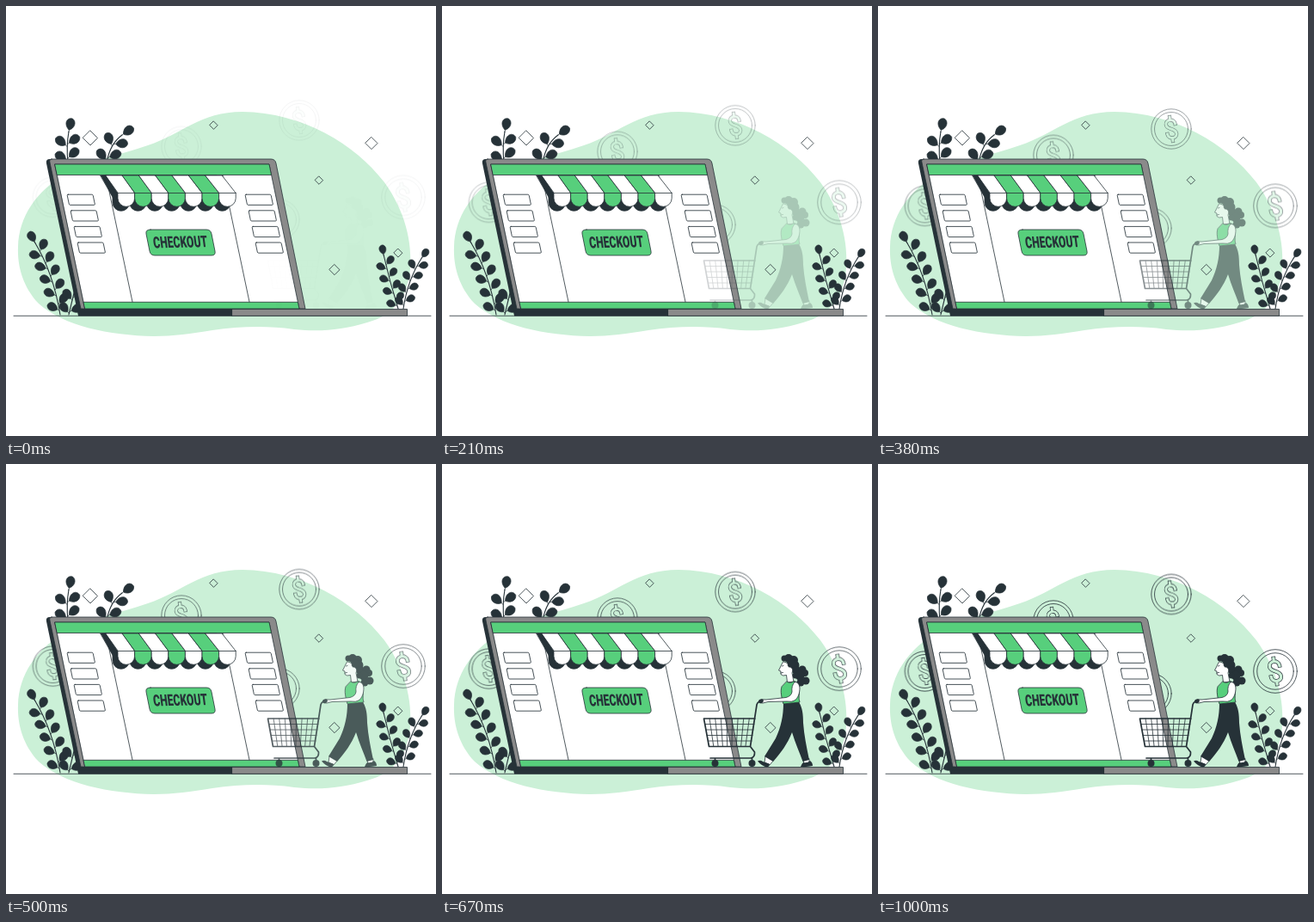
These frames come from a looping animation (500x500 px, 1.04 s). An HTML page:

```html
<!DOCTYPE html>
<html lang="en">
<head>
<meta charset="utf-8">
<title>Checkout</title>
<style>
html, body { margin: 0; width: 100%; height: 100%; overflow: hidden; background: #fff; }
svg { display: block; width: 100vw; height: 100vh; }
.line { fill: none; stroke: #263238; stroke-width: .8; stroke-linejoin: round; stroke-linecap: round; }
.ink { fill: #263238; }
.paper { fill: #fff; }
.mint { fill: #57cf7c; }
.grey { fill: #8a8a8a; }
.bar { stroke-width: 1.7; }
.label { font: 800 18.5px Roboto, "Liberation Sans", sans-serif; text-anchor: middle; }
</style>
</head>
<body>
<svg viewBox="0 0 500 500">
  <path fill="#cbf0d7" d="M275 123C345 124 405 160 440 205C465 240 472 275 470 305C467 340 450 360 420 368C390 377 365 379 335 376C300 371 270 373 240 377C215 381 195 384 172 384C120 383 67 372 38 346C20 327 13 303 14 280C15 245 35 215 70 195C100 179 130 174 165 162C205 149 225 123 275 123Z"/>
  <g id="coins"></g>
  <path class="line" d="M9 360.300H494"/>
  <g id="plants"></g>
  <g id="diamonds"></g>

  <g id="laptop">
    <path class="ink" d="M51 178Q46 178 47 183L84 360H92L56 178Z"/>
    <path class="line grey" d="M53 178H308Q313 178 314 183L348 352H87L51 182Q50 178 53 178Z"/>
    <path class="line paper" d="M57 184H306L341 352H92Z"/>
    <path class="line mint" d="M57 184H306L308.500 196.500H59.600Z"/>
    <path class="line mint" d="M90.300 344.300H339.300L341 352H92Z"/>
    <path class="line" d="M116 196.500L147 344M252 196.500L283 344"/>
    <path class="ink" d="M83.500 352H263V360.500H84Z"/>
    <path class="line grey" d="M263 352.500H466.500V360.300H263Z"/>
    <g id="cards"></g>
    <g id="awning"></g>
    <path class="line mint" d="M168 260H233Q238 260 239 265L243 285Q244 290 239 290H173Q168 290 167 285L163 265Q162 260 168 260Z"/>
    <text class="label ink" transform="matrix(.655 -.012 .13 1 203.500 280.800)">CHECKOUT</text>
  </g>

  <g id="shopper">
    <path id="mesh" class="line"/>
    <path class="line bar" d="M364 296H304.500L310.500 328.500H358M372 275.500Q367 276 366 280L358.500 328.500L363.500 335Q364 341 359 342H312M317.500 342V347M360.500 342V347"/>
    <circle class="ink" cx="317.500" cy="348" r="4"/>
    <circle class="ink" cx="360.500" cy="348" r="4"/>
    <path class="line paper" d="M376 340L375 347L381 350L386 344ZM420 344L421 349L427 348L427 343Z"/>
    <path class="ink" d="M367 345.500Q370 344 373 346L380.500 348.500Q382 351 378 352.500Q372 351.500 367 345.500ZM420 347Q425 348 428 345Q431 347 431 351Q424 352.500 417 352Q418 349 420 347Z"/>
    <path class="ink" d="M397 278C397 293 394 306 388 319L375 340L385 346C394 336 402 325 407 312C411 325 416 336 419.500 346L427 344C424 330 421 315 420 301C420 291 419 283 415 277Z"/>
    <g id="curls" class="ink"></g>
    <path class="line paper" d="M396.500 230C394.500 233 393.500 237 391.500 240L394 241L394 244.500Q396 247 400.500 245.500L401.500 254L409 253L407 243Q409 238 405 236Q402 237 402 232Z"/>
    <path class="line" d="M395.500 235L397 234.500M394 243L396.500 242.500"/>
    <path class="line mint" d="M401 253Q405 256 409 252.500Q414 253 415.500 260C416 267 414 272 416 277L397 279C395 272 393 264 395 259Z"/>
    <path class="line paper" d="M410 253.500Q415 253 416 260C416 267 414 272 410 275Q407 277 401 276L379 276.500L373 278Q368 278 369 275Q371 273 377 274L400 271.500Q406 270 407 265Q406 258 410 253.500Z"/>
    <path class="ink" d="M369 274Q373 272 374 275Q373 279 369 278Q367 276 369 274Z"/>
  </g>
</svg>
<script>
const NS = "http://www.w3.org/2000/svg";
const INK = "#263238", PALE = "#cbf0d7";
const byId = id => document.getElementById(id);

function add(parent, tag, attrs) {
  const el = document.createElementNS(NS, tag);
  for (const key in attrs) el.setAttribute(key, attrs[key]);
  return parent.appendChild(el);
}

// Coins: x, resting y, radius
const coins = [[341, 151.5, 23.2], [204, 182, 23.2], [54.5, 241, 23.2], [318, 267, 23.2], [462, 241, 25.3]]
  .map(([x, y, r]) => {
    const slot = add(byId("coins"), "g", { transform: `translate(${x} ${y})` });
    const coin = add(slot, "g", {});
    for (const k of [1, .84]) add(coin, "circle", { r: r * k, class: "line" });
    const sign = "M5.500 -6C5 -13 -6 -13 -6 -6C-6 1 6 -1 6 6.500C6 13 -5 13 -5.500 6M-.5 -11.500V-15M.5 11.500V15";
    for (const [stroke, width] of [[INK, 4.6], [PALE, 3.2]]) {
      add(coin, "path", {
        d: sign, fill: "none", stroke, "stroke-width": width, "stroke-linecap": "square",
        transform: `rotate(-6) scale(${r / 25})`
      });
    }
    return coin;
  });

// A curved stem with stalked leaves on alternating sides and one at the tip
function plant(x0, y0, x1, y1, x2, y2, pairs, size) {
  const g = byId("plants");
  add(g, "path", { d: `M${x0} ${y0}Q${x1} ${y1} ${x2} ${y2}`, class: "line", style: "stroke-width:1.1" });
  const at = t => {
    const u = 1 - t;
    return {
      x: u * u * x0 + 2 * u * t * x1 + t * t * x2,
      y: u * u * y0 + 2 * u * t * y1 + t * t * y2,
      a: Math.atan2(u * (y1 - y0) + t * (y2 - y1), u * (x1 - x0) + t * (x2 - x1)) * 180 / Math.PI
    };
  };
  const leaf = (t, turn) => {
    const p = at(t);
    add(g, "path", {
      d: "M0 0L.2 0C.4 -.42 .95 -.55 1.180 -.14C1.240 .34 .65 .56 .2 0", fill: INK, stroke: INK, "stroke-width": .05,
      transform: `translate(${p.x} ${p.y}) rotate(${p.a + turn}) scale(${size} ${turn < 0 ? size : -size})`
    });
  };
  for (let i = 0; i < pairs; i++) {
    const t = .05 + .9 * i / pairs;
    leaf(t, -50);
    leaf(t + .075, 50);
  }
  leaf(.97, 0);
}
plant(72, 182, 70, 163, 73, 146, 2, 14);
plant(117, 182, 121, 160, 135, 150, 2, 14);
plant(63, 359, 55, 310, 33, 274, 5, 13);
plant(73, 359, 76, 346, 83, 318, 2, 13);
plant(456, 352, 446, 320, 439, 289, 4, 11);
plant(462, 352, 467, 318, 484, 292, 4, 11);

// Diamonds: x, y, half size, fill
for (const [x, y, s, fill] of [
  [98, 153.5, 8.5, "#fff"], [241.5, 138.7, 4.6, "none"], [425, 159.6, 7, "#fff"],
  [364, 202.7, 4.6, "none"], [382, 306.7, 6, "none"], [456, 287.2, 4.9, "none"]
]) {
  add(byId("diamonds"), "path", {
    d: `M${x} ${y - s}l${s} ${s}l${-s} ${s}l${-s} ${-s}Z`, class: "line", style: `fill:${fill}`
  });
}

for (const left of [71, 278]) {
  for (let i = 0; i < 4; i++) {
    add(byId("cards"), "rect", {
      width: 30, height: 12.2, rx: 1.2, class: "line paper",
      transform: `translate(${left + 4 * i} ${219.2 + 18.6 * i}) skewX(11.8)`
    });
  }
}

// Awning: seven slanted stripes over a dark copy
const stripe = 19.6;
function flap(i, dx, dy, fill) {
  const x = 130 + stripe * i + dx, y = 217.5 + dy, r = stripe / 2;
  const top = 116 + 19.3 * i + dx;
  add(byId("awning"), "path", {
    d: `M${top} 197H${top + 19.3}L${x + stripe} ${y}v6a${r} ${r} 0 0 1 ${-stripe} 0v-6ZM${x} ${y}h${stripe}`,
    class: `line ${fill}`
  });
}
for (let i = 0; i < 7; i++) flap(i, -6, 5, "ink");
for (let i = 0; i < 7; i++) flap(i, 0, 0, i % 2 ? "mint" : "paper");

// Hair: overlapping curls from the fringe to the ends
for (const [x, y, r] of [
  [398, 226, 3.5], [403, 226, 5], [409, 228, 5], [410, 234, 5.5], [406, 232, 5], [412, 240, 5],
  [419, 239, 4.5], [422, 243, 4], [416, 246, 5.5], [423, 252, 4.5], [417, 254, 4.5], [411, 246, 3.5]
]) add(byId("curls"), "circle", { cx: x, cy: y, r });

// Basket wires
let mesh = "";
for (let i = 1; i < 9; i++) mesh += `M${304.5 + 6.6 * i} 296L${310.5 + 5.3 * i} 328.500`;
for (let i = 1; i < 5; i++) mesh += `M${304.5 + 1.2 * i} ${296 + 6.5 * i}H${364 - i}`;
byId("mesh").setAttribute("d", mesh);

// Motion: 25 held poses per loop
const LOOP = 1040, POSES = 25;
const timing = easing => ({ duration: 1000, fill: "both", easing });
const motions = coins.map(coin => coin.animate([
  { opacity: 0, transform: "translateY(-20px)" },
  { opacity: 1, transform: "translateY(0px)" }
], timing("ease-out")));
motions.push(byId("shopper").animate([{ opacity: 0 }, { opacity: 1 }], timing("cubic-bezier(.36, -.01, .5, 1.38)")));
motions.forEach(m => m.pause());

const start = performance.now();
function draw() {
  const t = (performance.now() - start) % LOOP;
  const pose = Math.min(POSES - 1, Math.floor((t + 5) / (LOOP / POSES)));
  for (const m of motions) m.currentTime = (pose + 1) * 1000 / POSES;
  requestAnimationFrame(draw);
}
draw();
</script>
</body>
</html>
```
